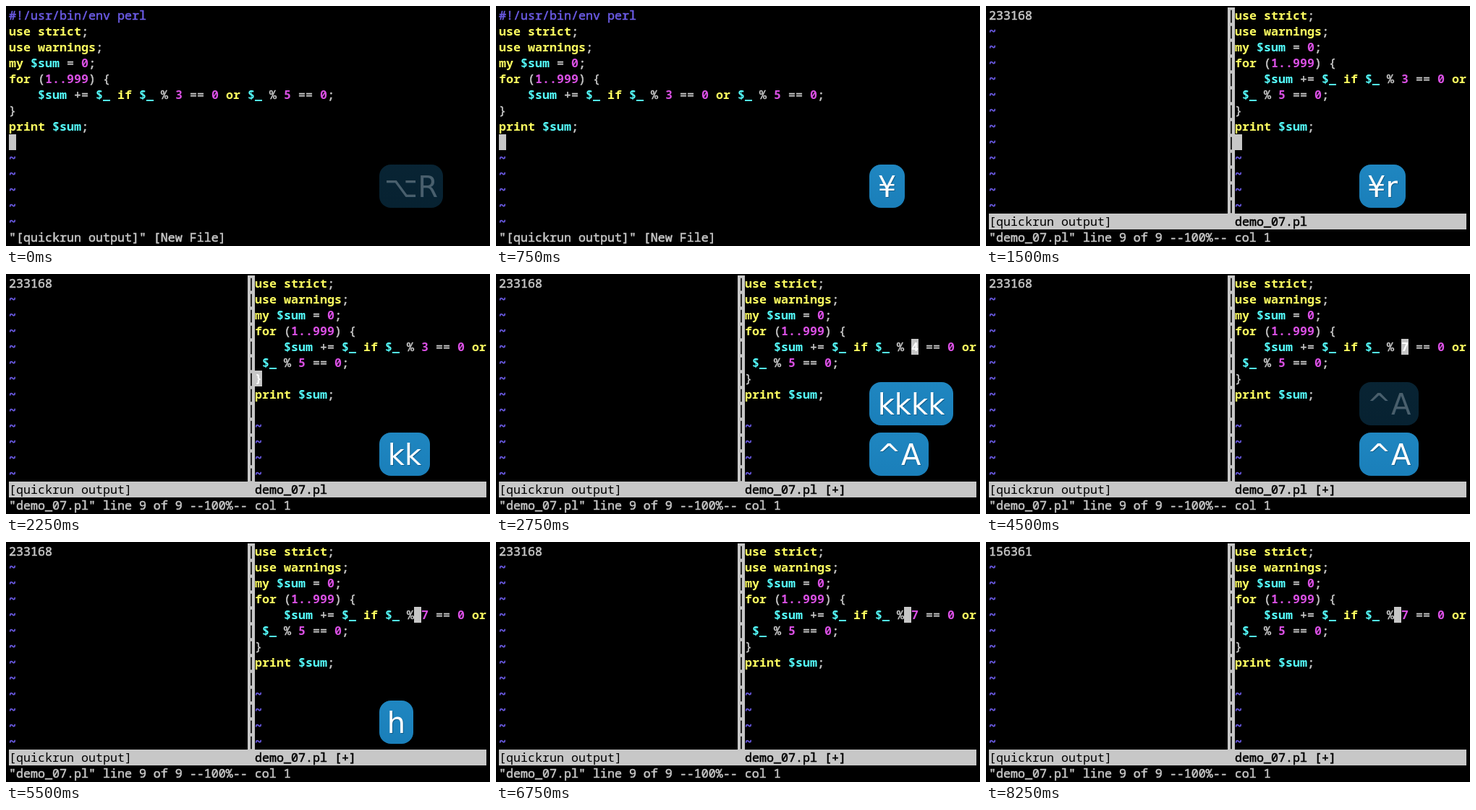
An HTML page that plays this animation: 669x333 px, repeating every 8500 ms.

```html
<!DOCTYPE html>
<html lang="en">
<head>
<meta charset="utf-8">
<title>Quickrun demo</title>
<style>
  html, body { margin: 0; width: 100%; height: 100%; overflow: hidden; background: #000; }
  svg { display: block; width: 669px; height: 333px; }
  .term { font: 16.667px "Noto Sans Mono", "DejaVu Sans Mono", monospace; white-space: pre; }
  .term .medium { stroke: currentColor; stroke-width: .55px; }
  .term .bold { font-weight: 700; }
  .keys { font: 40px "DejaVu Sans", sans-serif; text-anchor: middle; }
</style>
</head>
<body>
<svg viewBox="0 0 669 333">
  <defs>
    <linearGradient id="key" x1="0" y1="0" x2="0" y2="1">
      <stop offset="0" stop-color="#1f86c0"/>
      <stop offset="1" stop-color="#1a7fba"/>
    </linearGradient>
  </defs>
  <rect width="669" height="333"/>
  <g class="term" id="term"></g>
  <g class="keys" id="keys"></g>
</svg>
<script>
const LOOP = 8500, STEP = 250;
const CELL_W = 10, CELL_H = 22, LEFT = 4, TOP = 2;
const RIGHT_PANE = 34, STATUS_ROW = 13, MESSAGE_ROW = 14;
const SPLIT_AT = 1000, FIRST_OUTPUT_AT = 1250, SECOND_OUTPUT_AT = 7500;
const MOVES = [2000, 2250, 2500, 2500];
const INCREMENTS = [2750, 3250, 3750, 4250];
const STEP_LEFT_AT = 5250;

const COLORS = {
  plain: '#c7c7c7', comment: '#6c5ce7', variable: '#55ffff',
  number: '#d84fe2', keyword: '#ffff60', tilde: '#6c5ce7'
};
const TOKENS = /(?<comment>#!.*)|(?<variable>\$\w+)|(?<number>\d+(\.\.\d+)?)|(?<keyword>[a-z]+)|(?<plain>[^\s\w$]+)/g;

// Each badge lists when its label was typed; repeated keys share one badge.
const BADGES = [
  [[-750, '⌥R', 88]],
  [[750, '¥', 49], [1000, '¥r', 64]],
  [[2000, 'k', 47], [2250, 'kk', 70], [2500, 'kkkk', 116]],
  ...INCREMENTS.map(at => [[at, '^A', 82]]),
  [[STEP_LEFT_AT, 'h', 47]],
  [[7000, '¥', 49], [7250, '¥r', 64]]
];

const passed = (times, t) => times.filter(at => t >= at).length;
const escapeText = s => s.replace(/&/g, '&amp;').replace(/</g, '&lt;');

function box(col, row, cols, rows = 1) {
  return `<rect x="${LEFT + col * CELL_W}" y="${TOP + row * CELL_H}" width="${cols * CELL_W}" height="${rows * CELL_H}" fill="${COLORS.plain}"/>`;
}

function write(text, col, row, color = COLORS.plain, weight = 'medium') {
  return `<text x="${LEFT + col * CELL_W}" y="${TOP + row * CELL_H + 17}" fill="${color}" color="${color}" class="${weight}">${escapeText(text)}</text>`;
}

function writeCode(line, col, row) {
  let out = '';
  for (const match of line.matchAll(TOKENS)) {
    const kind = Object.keys(match.groups).find(name => match.groups[name]);
    const weight = kind === 'plain' || kind === 'comment' ? 'medium' : 'bold';
    out += write(match[0], col + match.index, row, COLORS[kind], weight);
  }
  return out;
}

function tildes(col, from, to) {
  let out = '';
  for (let row = from; row < to; row++) out += write('~', col, row, COLORS.tilde, 'medium bold');
  return out;
}

function program(digit) {
  return [
    '#!/usr/bin/env perl', 'use strict;', 'use warnings;', 'my $sum = 0;',
    'for (1..999) {', `    $sum += $_ if $_ % ${digit} == 0 or $_ % 5 == 0;`,
    '}', 'print $sum;'
  ];
}

function singleWindow() {
  return program(3).map((line, row) => writeCode(line, 0, row)).join('')
    + box(0, 8, 1) + tildes(0, 9, MESSAGE_ROW)
    + write('"[quickrun output]" [New File]', 0, MESSAGE_ROW);
}

function cursorAt(t, increments) {
  if (t >= STEP_LEFT_AT) return [22, 4];
  if (increments) return [23, 4];
  return [0, 8 - passed(MOVES, t)];
}

function splitWindow(t) {
  const increments = passed(INCREMENTS, t);
  const digit = 3 + increments;
  const lines = program(digit).slice(1)
    .flatMap(line => line.length > 32 ? [line.slice(0, 32), line.slice(32)] : [line]);
  const [col, row] = cursorAt(t, increments);
  const under = lines[row]?.[col] ?? ' ';
  const output = t >= SECOND_OUTPUT_AT ? '156361' : t >= FIRST_OUTPUT_AT ? '233168' : '';

  let out = write(output, 0, 0) + tildes(0, 1, STATUS_ROW);
  out += box(33, 0, 1, STATUS_ROW);
  for (let r = 0; r < STATUS_ROW; r++) out += write('|', 33, r, '#000');
  out += lines.map((line, r) => writeCode(line, RIGHT_PANE, r)).join('');
  out += tildes(RIGHT_PANE, 9, STATUS_ROW);
  out += box(RIGHT_PANE + col, row, 1);
  if (under !== ' ') out += write(under, RIGHT_PANE + col, row, '#fff', 'bold');
  out += box(0, STATUS_ROW, 66) + write('[quickrun output]', 0, STATUS_ROW, '#000', 'regular');
  out += write('demo_07.pl' + (increments ? ' [+]' : ''), RIGHT_PANE, STATUS_ROW, '#000');
  return out + write('"demo_07.pl" line 9 of 9 --100%-- col 1', 0, MESSAGE_ROW);
}

function badges(t) {
  const typed = BADGES.map(steps => steps.filter(([at]) => t >= at).pop()).filter(Boolean);
  return typed.reverse().map(([at, label, width], slot) => {
    const opacity = Math.min(1, (840 - (t - at)) / 340);
    if (opacity <= 0) return '';
    const y = 220 - slot * 70, middle = 516 + width / 2;
    return `<g fill-opacity="${opacity}">
      <rect x="516" y="${y}" width="${width}" height="60" rx="16" fill="url(#key)"/>
      <text x="${middle + 1}" y="${y + 46}" fill="#0b3f60" opacity=".5">${label}</text>
      <text x="${middle}" y="${y + 44.5}" fill="#fff">${label}</text>
    </g>`;
  }).join('');
}

const term = document.getElementById('term');
const keys = document.getElementById('keys');
let shown = -1;

function render(time) {
  const t = Math.floor((time % LOOP) / STEP) * STEP;
  if (t === shown) return;
  shown = t;
  term.innerHTML = t < SPLIT_AT ? singleWindow() : splitWindow(t);
  keys.innerHTML = badges(t);
}

const start = performance.now();
function tick() {
  render(performance.now() - start);
  requestAnimationFrame(tick);
}
tick();
</script>
</body>
</html>
```
